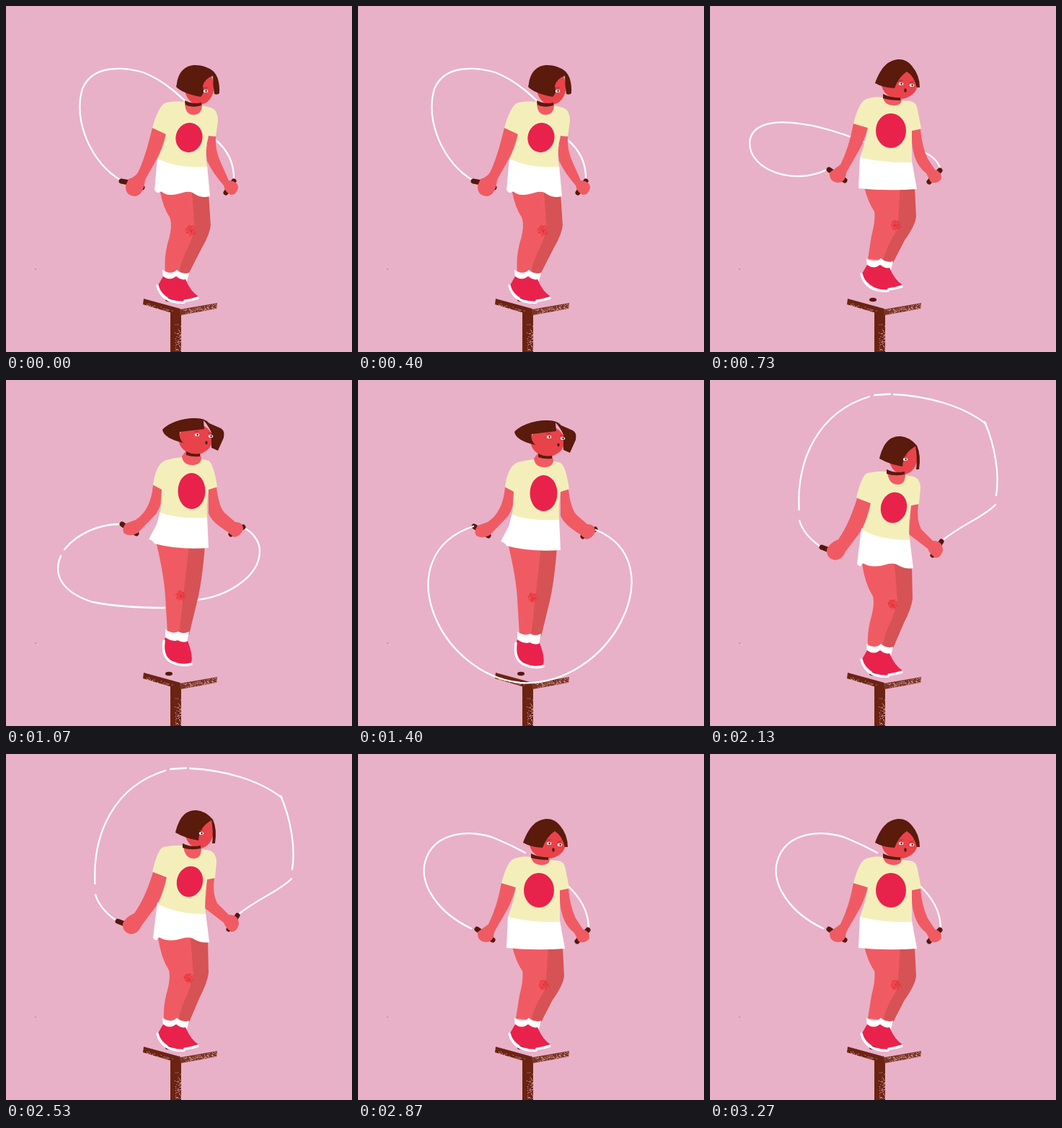
An HTML page that plays this animation: 480x480 px, repeating every 3.34 s.

```html
<!DOCTYPE html>
<html lang="en">
<head>
<meta charset="utf-8">
<title>Skipping rope</title>
<style>
html, body { margin: 0; width: 100%; height: 100%; overflow: hidden; background: #e8b1c8; }
svg { display: block; width: 100%; height: 100%; }
</style>
</head>
<body>
<svg id="stage" viewBox="0 0 480 480"></svg>
<script>
const SKIN = '#f05b63', FACE = '#e8434b', SHADE = '#d65255', RED = '#e9224c';
const HAIR = '#5a1a0c', DARK = '#54180f', CREAM = '#f4efba', WHITE = '#fff', PINK = '#e8b1c8';

// Standing feet, shared by the grounded poses
const feet = {
  socks: 'M217 366Q229 374 237 366Q245 373 254 370L251 382L218 378Z',
  shoes: 'M218 375Q227 382 236 375Q244 381 249 379Q256 396 267 403Q262 409 249 410Q225 412 210 389Z',
  sole: 'M210 388Q215 406 232 410Q241 412 247 411M248 409Q258 408 266 405'
};

const B = {
  ...feet,
  front: 'M214 258Q218 280 227 293Q232 305 224 330Q219 350 221 371L240 372Q243 353 252 336L262 312L258 258Z',
  back: 'M253 258L281 260L284 304Q283 316 272 335L253 372L238 372Q241 350 257 322Z',
  knee: [256, 311],
  shorts: 'M210 211L206 255Q210 262 215 257Q224 266 245 259Q255 255 262 261Q271 267 283 264L279 221Z',
  shirt: 'M222 134Q235 131 247 133L272 138L284 141Q294 144 294 160L291 181L281 180Q275 200 279 223Q240 226 210 212Q219 195 222 178L203 169Q212 137 222 134Z',
  dot: [254, 182.5, 18.5, 20.5, 15],
  neck: 'M248 133C248 146 253 151 260 151C268 151 272 146 272 136Z',
  choker: 'M248 131Q260 137 271 134L271 138Q258 142 249 137Z',
  face: [268, 112, 20.5, 25],
  hair: 'M263 82C248 82 239 92 237 108L236 112Q244 121 270 126Q276 121 273 111Q276 100 287 97Q287 110 289 122Q293 124 296 121Q297 99 287 90Q276 82 263 82Z',
  eyes: [277, 118],
  armL: 'M203 169L222 177Q216 202 206 218L193 241Q191 262 179 264Q165 263 166 249L170 240Q178 238 183 231Q193 211 203 169Z',
  armR: 'M281 180L291 181Q290 200 297 215L309 242Q322 243 322 252Q320 262 312 262Q304 259 302 249Q287 232 279 215Q276 200 281 180Z',
  grips: 'M160 243L171 245L189 252M316 243L305 259',
  rope: 'M160 242C120 220 92 160 106 115C120 80 165 85 190 92C220 103 245 128 262 145M290 185C308 200 317 220 316 242'
};

const b = {
  ...feet,
  front: 'M214 268Q220 290 228 301Q230 312 224 335L219 367L240 369Q245 348 260 327L264 268Z',
  back: 'M258 268L284 268L286 308Q285 320 270 341L254 372L238 369Q246 342 257 327Z',
  knee: [257, 320],
  shorts: 'M208 225L206 269Q245 273 287 270L280 231Z',
  shirt: 'M217 145Q228 141 240 143L266 147L278 148Q286 149 288 160L293 186L280 189L280 233Q240 234 208 226Q216 205 219 185L199 179Q207 148 217 145Z',
  dot: [251, 189, 21, 24],
  neck: 'M240 141C240 150 247 154 255 154C262 154 266 151 266 145Z',
  choker: 'M240 138Q252 144 264 143L264 147Q250 147 240 144Z',
  face: [263, 124, 25, 21],
  hair: 'M262 90C245 91 236 104 229 123Q239 129 256 130Q262 114 273 107Q283 113 287 129L291 129Q291 112 280 99Q273 90 262 90Z',
  eyes: [265, 124, 280, 126],
  mouth: [271, 133, 1.8, 2.8],
  armL: 'M199 179L219 185Q212 209 204 221L189 247Q188 262 176 261Q165 259 166 247L181 236Q193 212 199 179Z',
  armR: 'M280 189L292 187Q294 211 302 228L312 243Q322 246 321 256Q314 264 306 260L300 248Q278 232 280 189Z',
  grips: 'M165 243L187 258M319 244L304 260',
  rope: 'M157 242C110 220 85 180 93 150C105 105 160 105 190 117Q212 126 232 137M288 180C305 195 320 215 320 242'
};

const O = {
  ...feet,
  front: 'M211 255Q215 283 226 300Q229 312 222 335Q218 352 219 369L239 371Q242 352 253 330L260 306L256 255Z',
  back: 'M252 255L280 257L281 304Q279 318 269 337L254 372L237 371Q240 350 256 320Z',
  knee: [253, 311],
  shorts: 'M210 206L204 255Q208 262 212 254Q225 262 244 256Q255 252 261 257Q272 263 282 261L277 220Z',
  shirt: 'M219 129Q233 126 246 127L271 132L283 134Q292 138 292 150L290 172L279 174Q274 198 277 222Q236 222 211 208Q220 188 223 171L203 163Q211 130 219 129Z',
  dot: [255, 177, 18, 21.5, 15],
  neck: 'M246 127C247 140 253 145 260 145C268 145 271 140 271 130Z',
  choker: 'M245 124Q257 130 270 127L270 131Q256 134 245 130Z',
  face: [268, 106, 20, 25],
  hair: 'M264 78C247 78 240 90 235 109Q249 117 267 120Q268 101 285 92Q288 108 286 124L290 124Q293 104 287 91Q277 79 264 78Z',
  eyes: [271, 110],
  armL: 'M204 164L223 171Q215 205 203 218L188 238Q184 249 173 250Q161 247 162 235Q166 226 178 221Q193 200 204 164Z',
  armR: 'M279 174L289 172Q286 194 293 207L309 223Q323 223 323 236Q321 246 313 247Q305 242 302 234L276 214Z',
  grips: 'M155 232L168 237M321 224L309 243',
  rope: 'M153 231Q130 215 124 195M123.500 180C120 110 150 45 221 23M228 21L250 19.500M255 20C300 22 350 35 383 61M381 58C395 90 402 130 397 160M396 173C380 190 350 200 323 222'
};

const F = {
  front: 'M208 250Q212 285 222 305Q222 340 218 366L239 368Q246 340 255 316L255 250Z',
  back: 'M250 250L280 252L276 315Q269 330 264 350L257 373L239 368Q241 345 252 318Z',
  knee: [249, 308],
  shorts: 'M212 207L203 209L201 255Q205 264 208 252Q225 260 245 254Q264 259 282 255L279 221Z',
  shirt: 'M222 124Q235 121 246 122L271 125L283 128Q291 132 291 145L289 166L277 167Q272 195 275 222Q232 226 210 209Q221 188 224 165L205 157Q212 126 222 124Z',
  dot: [256, 172, 18, 22, 15],
  neck: 'M245 122C246 135 252 140 259 140C268 140 272 135 272 125Z',
  choker: 'M246 119Q258 126 270 122L270 126Q257 129 246 125Z',
  face: [266, 101, 20, 24],
  hair: 'M264 74C246 75 239 88 234 109Q247 115 263 117Q263 96 281 84Q285 100 280 123L288 124Q291 98 285 84Q276 74 264 74Z',
  eyes: [270, 101],
  line: 'M273 111L279 113',
  socks: 'M217 362Q228 369 237 363Q246 370 257 369L253 381L219 376Z',
  shoes: 'M219 374Q230 381 237 374Q247 380 253 377Q256 395 267 402Q260 408 246 406L246 412Q220 408 211 389Z',
  sole: 'M211 388Q220 407 236 411L246 412M248 407Q258 407 266 402',
  armL: 'M205 158L224 165Q216 190 205 203L183 227Q183 241 168 243Q153 240 155 230L173 211Q192 196 205 158Z',
  armR: 'M277 168L285 165Q283 184 290 193L313 215Q327 216 327 228Q322 238 312 235L305 226Q290 218 275 203Z',
  grips: 'M150 219L181 233M326 217L310 233',
  ahead: true,
  rope: 'M145 217Q125 208 129 192C140 170 170 158 205 153C250 146 300 148 350 156M362 158C400 163 432 180 432 198C428 215 390 214 331 213'
};

const L = {
  front: 'M209 228Q219 270 221 300L224 351L240 353L254 228Z',
  back: 'M249 230L276 230Q272 280 265 308L254 353L239 351Q238 325 242 300Z',
  knee: [242, 299],
  shorts: 'M214 182L209 200L198 221Q203 222 206 227Q240 236 281 233L279 188Z',
  shirt: 'M222 111Q234 108 244 107L270 109L281 112Q288 116 293 148L281 152Q278 170 279 191Q240 193 214 184L216 152L204 145Q208 116 222 111Z',
  dot: [257.500, 154, 19, 25],
  neck: 'M244 106L250 98L269 99L271 109C270 116 265 118 258 118C250 118 245 114 244 106Z',
  choker: 'M250 99Q259 104 269 102L269 106Q258 107 250 104Z',
  face: [263, 82, 23.500, 21],
  hair: 'M264 53C246 52 224 60 217 69Q219 81 246 87Q239 81 241 72L275 68L274 56Q280 62 285 73L285 94L294 98L302 80Q304 70 298 67L282 60Q276 53 264 53Z',
  eyes: [265, 76, 284, 78],
  mouth: [278, 87, 1.6, 2.4],
  socks: 'M221 346Q231 353 239 349Q246 353 254 349L251 364L221 360Z',
  shoes: 'M221 357Q231 364 238 361Q247 366 252 362Q260 382 257 393Q235 400 221 386Q215 370 221 357Z',
  sole: 'M219 362Q216 384 229 391Q244 398 257 394',
  armL: 'M204 146L219 153Q217 172 208 186L183 212Q174 218 164 213Q160 207 166 199L180 194Q201 180 204 146Z',
  armR: 'M281 152L292 149Q295 175 303 184L318 197Q329 197 329 207Q326 217 316 218L308 211Q285 197 281 185Z',
  grips: 'M161 200L181 213M329 204L312 214',
  rope: 'M158 200C130 200 100 212 81 235M76 244C62 277 88 298 120 308Q160 316 220 316M265 305C303 301 352 275 352 237C352 222 340 210 330 205'
};

const U = { ...L, dy: 3, ahead: true,
  rope: 'M160 200C40 240 110 405 225 417C350 425 440 250 330 205' };
const K = { ...b, dy: -16,
  rope: 'M162 243C115 265 50 245 50 206C52 160 150 175 230 212M285 215Q314 222 320 243' };
const J = { ...K,
  rope: 'M162 243C118 265 55 245 55 206C57 160 150 175 230 212M285 215Q314 222 320 243' };
const G = { ...F,
  rope: 'M148 219Q125 214 129 200C140 178 170 170 205 166C280 160 396 175 396 202C392 216 365 214 329 214' };

const poses = { B, b, O, F, L, U, K, J, G };
const order = 'BOFULK' + 'BOGULJ' + 'bOGULK' + 'bOFULK' + 'bOFULK' + 'bB' + 'OGULJ' + 'bOGULK' + 'bOFULK' + 'b';
const LOOP = 3340;

let seed = 7;
const rnd = () => (seed = seed * 16807 % 2147483647) / 2147483647;
const fill = (d, c) => `<path d="${d}" fill="${c}"/>`;
const line = (d, c, w) => `<path d="${d}" fill="none" stroke="${c}" stroke-width="${w}" stroke-linecap="round" stroke-linejoin="round"/>`;
const oval = ([x, y, rx, ry, tilt = 0], c) =>
  `<ellipse cx="${x}" cy="${y}" rx="${rx}" ry="${ry}" transform="rotate(${tilt} ${x} ${y})" fill="${c}"/>`;

// Speckles: point(u, v) maps the unit square to the area
function grain(n, color, point) {
  let d = '';
  for (let i = 0; i < n; i++) {
    const [x, y] = point(rnd(), rnd());
    d += `M${x.toFixed(1)} ${y.toFixed(1)}h1v1h-1z`;
  }
  return fill(d, color);
}

function eyes(list) {
  let s = '';
  for (let i = 0; i < list.length; i += 2) {
    const x = list[i], y = list[i + 1];
    s += oval([x, y, 3.2, 2], WHITE) + oval([x + .6, y, 1.2, 1.4], DARK);
    s += line(`M${x - 3} ${y - 4}l5 -1`, '#a52a2c', 1);
  }
  return s;
}

function knee([x, y]) {
  return oval([x, y, 6, 6.5], '#e8262f55') + grain(45, '#e8262f', (u, v) => {
    const r = 8 * u, a = v * 2 * Math.PI;
    return [x + r * Math.cos(a), y + r * Math.sin(a)];
  });
}

function figure(p) {
  const rope = line(p.rope, WHITE, 2.3);
  return (p.ahead ? '' : rope) +
    fill(p.back, SHADE) + fill(p.front, SKIN) + knee(p.knee) +
    fill(p.socks, WHITE) + fill(p.shoes, RED) + line(p.sole, WHITE, 3.5) +
    line(p.grips, DARK, 7) + fill(p.armR, SKIN) + fill(p.armL, SKIN) +
    fill(p.shorts, WHITE) + fill(p.shirt, CREAM) + fill(p.neck, SKIN) + oval(p.dot, RED) +
    oval(p.face, FACE) + fill(p.choker, HAIR) + fill(p.hair, HAIR) + eyes(p.eyes) +
    (p.mouth ? oval(p.mouth, DARK) : '') + (p.line ? line(p.line, DARK, 1.3) : '') +
    (p.ahead ? rope : '');
}

function stool() {
  return fill('M228 424L243 424L243 480L228 480Z', '#6b2412') +
    fill('M191 406L242 420L241 429L190 414Z', '#6b2412') +
    fill('M241 421L293 412L292 420L242 429Z', '#7a3524') +
    grain(50, PINK, (u, v) => [242 - 8 * u * u, 430 + 49 * Math.sqrt(v)]) +
    grain(20, PINK, (u, v) => [195 + 40 * u, 412 + 11 * u + 3 * v]) +
    grain(80, PINK, (u, v) => [246 + 45 * u, 421 - 8 * u + 7 * v]) +
    oval([226, 407.5, 5, 2.8], DARK) + oval([217, 407, 5, 2.5], DARK).replace(DARK, 'none') +
    oval([41, 365, .7, .7], '#8d5a6c');
}

const stage = document.getElementById('stage');
stage.innerHTML = `<rect width="480" height="480" fill="${PINK}"/>` + stool() +
  Object.entries(poses).map(([k, p]) =>
    `<g id="pose-${k}" transform="translate(0 ${p.dy || 0})" visibility="hidden">${figure(p)}</g>`).join('');

const groups = {};
for (const k in poses) groups[k] = document.getElementById('pose-' + k);

const startOf = i => Math.round(i * 20 / 3) * 10;
let shown = null;

function draw(now) {
  const t = now % LOOP;
  let i = Math.min(order.length - 1, Math.floor(t * 3 / 200) + 1);
  while (i > 0 && startOf(i) > t) i--;
  const next = groups[order[i]];
  if (next !== shown) {
    if (shown) shown.setAttribute('visibility', 'hidden');
    next.setAttribute('visibility', 'visible');
    shown = next;
  }
}

draw(0);
let begin = null;
function tick(now) {
  if (begin === null) begin = now;
  draw(now - begin);
  requestAnimationFrame(tick);
}
requestAnimationFrame(tick);
</script>
</body>
</html>
```
